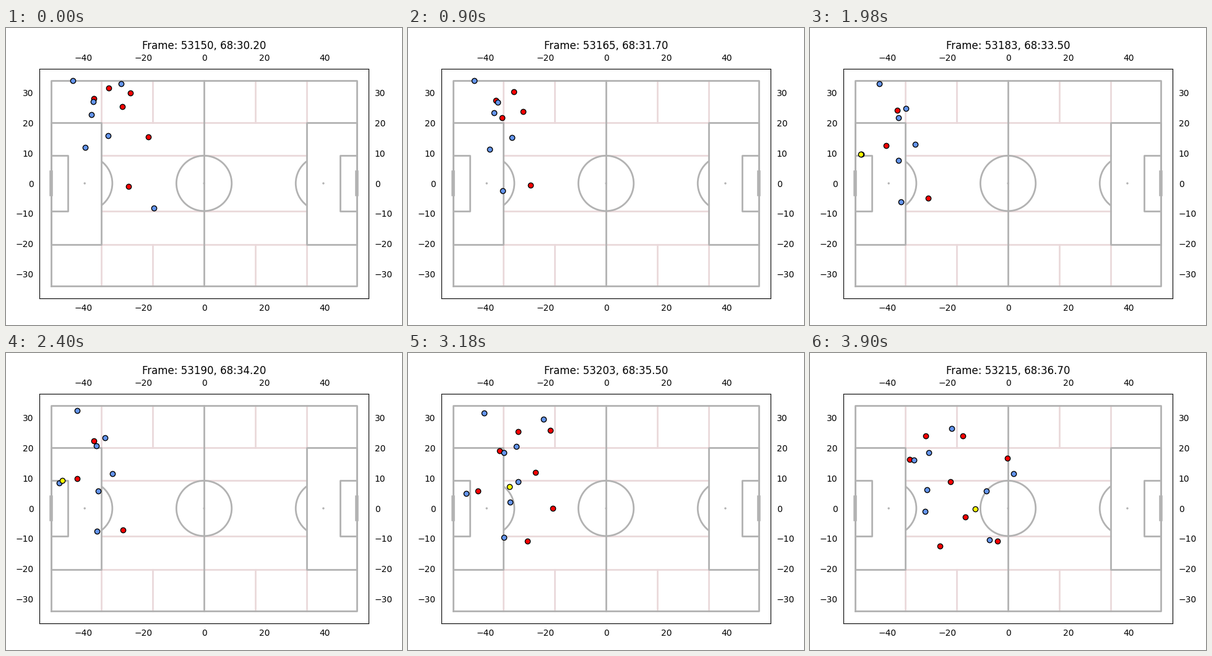
A matplotlib script that plays this animation: 640x480 px, repeating every 4560 ms.

```python
import matplotlib.pyplot as plt
import numpy as np
from matplotlib.animation import FuncAnimation
from matplotlib.patches import Arc, Circle

W, H = 640, 480
CX, CY = 320.06, 251.07        # centre spot on the canvas, pixels
SCALE = 4.883                  # pixels per metre
HALF_X, HALF_Y = 54.46, 38     # visible half extents, metres
STEPS, LAST = 76, 65
GREY, PINK = "#b2b2b2", "#ead9db"
COLORS = {"red": "#ff0000", "blue": "#6495ed", "ball": "#ffff00"}

plt.rcParams["font.family"] = "DejaVu Sans"
fig = plt.figure(figsize=(W / 100, H / 100), dpi=100, facecolor="white")
ax = fig.add_axes([(CX - HALF_X * SCALE) / W, 1 - (CY + HALF_Y * SCALE) / H,
                   2 * HALF_X * SCALE / W, 2 * HALF_Y * SCALE / H])
ax.set(xlim=(-HALF_X, HALF_X), ylim=(-HALF_Y, HALF_Y),
       xticks=range(-40, 41, 20), yticks=range(-30, 31, 10))
ax.tick_params(length=0, pad=7, labelsize=10, labeltop=True, labelright=True)
title = fig.text(0.5, 1 - 34 / H, "", ha="center", va="baseline", fontsize=12)


def line(xs, ys, color=GREY, lw=2, z=2):
    ax.plot(xs, ys, color=color, lw=lw, zorder=z)


def rect(x0, x1, y):
    line([x0, x1, x1, x0, x0], [-y, -y, y, y, -y])


def draw_pitch():
    length, width = 50.5, 34
    box_x, box_y, area_x, area_y = 34, 20.16, 45, 9.16
    radius = 9.15
    half = np.degrees(np.arccos(5.5 / radius))
    for s in (-1, 1):
        for y in (area_y, box_y):
            line([-box_x, box_x], [s * y, s * y], PINK, z=1)
        for x in (-box_x, -17, 17, box_x):
            line([x, x], [s * box_y, s * width], PINK, z=1)
        rect(s * length, s * box_x, box_y)
        rect(s * length, s * area_x, area_y)
        line([s * length] * 2, [-3.66, 3.66], lw=4)
        ax.add_patch(Circle((s * 39.5, 0), 0.35, color=GREY, lw=0))
        ax.add_patch(Arc((s * 39.5, 0), 2 * radius, 2 * radius, angle=90 + s * 90,
                         theta1=-half, theta2=half, color=GREY, lw=2))
    rect(-length, length, width)
    line([0, 0], [-width, width])
    ax.add_patch(Circle((0, 0), radius, fill=False, ec=GREY, lw=2))
    ax.add_patch(Circle((0, 0), 0.35, color=GREY, lw=0, zorder=3))


class Run:
    """Smooth curve passing its points (canvas pixels) at even times from first to last."""

    def __init__(self, first, last, *points):
        self.first, self.last, self.n = first, last, len(points)
        self.coeffs = np.linalg.solve(np.vander(np.linspace(0, 1, self.n)), points)

    def seen(self, k):
        return self.first <= k <= self.last

    def at(self, k):
        u = (k - self.first) / (self.last - self.first)
        x, y = np.vander([u], self.n)[0] @ self.coeffs
        return (x - CX) / SCALE, (CY - y) / SCALE


runs = {
    "red": [
        Run(0, LAST, (142, 114), (141.5, 122), (143, 146), (161, 172)),
        Run(0, LAST, (198, 256), (195.5, 260), (189, 291), (210, 312)),
        Run(0, 60, (166, 97), (144, 159), (115, 203), (123, 231)),
        # out of view early
        Run(0, 19, (201, 105), (163, 102)),
        Run(0, 19, (188, 127), (185.5, 137)),
        Run(0, 11, (230, 176), (219, 180)),
        # into view on the break
        Run(51, LAST, (177, 126), (187, 134)),
        Run(51, LAST, (227, 124), (247, 134)),
        Run(51, LAST, (203, 190), (227, 208)),
        Run(51, LAST, (231, 249), (251, 265)),
        Run(61, LAST, (322, 167), (319, 170)),
        Run(61, LAST, (301, 308), (303, 304)),
    ],
    "blue": [
        Run(0, LAST, (138, 140), (139.5, 139), (148, 152.5), (168, 173)),
        Run(0, LAST, (165, 174), (169, 180), (173, 198), (189, 221)),
        Run(0, LAST, (128, 193), (135.5, 201), (153, 228), (186, 256)),
        Run(0, 53, (108, 85), (107.5, 85.5), (113, 91), (123, 97)),
        Run(0, 41, (141, 119), (147, 122), (161, 138)),
        Run(9, 62, (157, 258), (147.5, 274), (149, 292), (164, 301)),
        Run(17, 54, (84, 196), (84, 206), (95, 228)),
        # out of view early
        Run(0, 11, (186, 90), (182, 94)),
        Run(0, 11, (239, 291), (229, 291)),
        # into view on the break
        Run(51, LAST, (217, 104), (229, 122)),
        Run(51, LAST, (172, 149), (192, 161)),
        Run(55, LAST, (271, 210), (285, 223)),
        Run(55, LAST, (270, 319), (290, 302)),
        Run(61, LAST, (331, 191), (329, 195)),
    ],
    "ball": [
        Run(17, 46, (77, 153), (77, 190), (86, 207), (98, 191)),
        Run(47, LAST, (100, 190), (193, 227), (267, 252)),
    ],
}

draw_pitch()
dots = {team: ax.plot([], [], "o", ms=6, mfc=color, mec="black", mew=1, zorder=5 + i)[0]
        for i, (team, color) in enumerate(COLORS.items())}


def update(i):
    k = min(i, LAST)
    for team, dot in dots.items():
        spots = [run.at(k) for run in runs[team] if run.seen(k)]
        dot.set_data([x for x, _ in spots], [y for _, y in spots])
    title.set_text(f"Frame: {53150 + k}, 68:{30.2 + k / 10:05.2f}")
    return [*dots.values(), title]


anim = FuncAnimation(fig, update, frames=STEPS, interval=60, repeat=True,
                     repeat_delay=0, blit=False)
plt.show()
```
